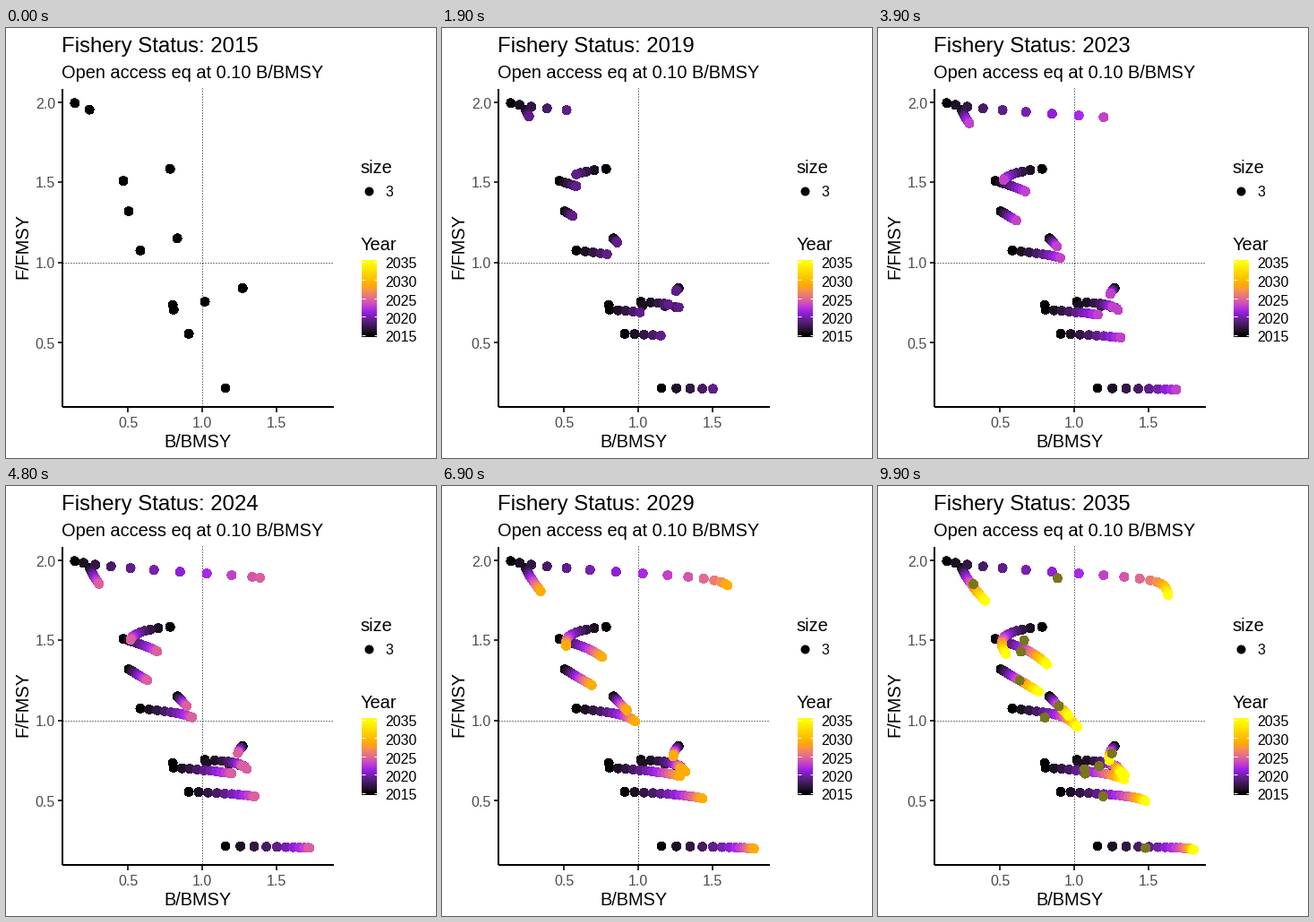
Recreate the animation shown at these times as a matplotlib script. Size 480 by 480 pixels, loop 10000 ms.

```python
import numpy as np
import matplotlib.pyplot as plt
from matplotlib.animation import FuncAnimation
from matplotlib.colors import to_rgb

plt.rcParams["font.family"] = ["Liberation Sans"]
PX = 0.9  # points per pixel at 80 dpi
START, YEARS = 2015, 21
DECAY = 0.9944  # yearly change of F/FMSY


def stock(b, f, growth, share=1.0):
    """Surplus-production path of B/BMSY while fishing pressure fades."""
    path = []
    for _ in range(YEARS):
        path.append((b, f))
        b += growth * b * (2 - share * f - b)
        f *= DECAY
    return path


STOCKS = [
    stock(0.145, 1.995, 0.28, share=0.205),
    stock(0.242, 1.955, 0.125, share=0.8),
    stock(0.470, 1.51, 0.26, share=0.85),
    stock(0.783, 1.585, 0.273),
    stock(0.506, 1.32, 0.084, share=0.9),
    stock(0.831, 1.15, 0.105, share=0.95),
    stock(0.584, 1.075, 0.295),
    stock(0.801, 0.735, 0.61),
    stock(0.807, 0.705, 0.14),
    stock(1.017, 0.755, 0.285),
    stock(1.270, 0.84, 0.036),
    stock(0.909, 0.555, 0.136),
    stock(1.155, 0.215, 0.138),
]


def x_px(b):
    return 52.3 + 166.4 * b


def y_px(f):
    return 439.9 - 178.7 * f


# Colours are blended in CIE Lab.
TO_XYZ = np.array([[0.4124, 0.3576, 0.1805],
                   [0.2126, 0.7152, 0.0722],
                   [0.0193, 0.1192, 0.9505]])
WHITE = TO_XYZ.sum(axis=1)


def rgb_to_lab(rgb):
    rgb = np.asarray(rgb, float)
    lin = np.where(rgb > 0.04045, ((rgb + 0.055) / 1.055) ** 2.4, rgb / 12.92)
    v = TO_XYZ @ lin / WHITE
    x, y, z = np.where(v > 0.008856, np.cbrt(v), 7.787 * v + 16 / 116)
    return np.array([116 * y - 16, 500 * (x - y), 200 * (y - z)])


def lab_to_rgb(lab):
    y = (lab[0] + 16) / 116
    v = np.array([y + lab[1] / 500, y, y - lab[2] / 200])
    xyz = np.where(v > 0.2069, v ** 3, (v - 16 / 116) / 7.787) * WHITE
    lin = np.clip(np.linalg.solve(TO_XYZ, xyz), 0, 1)
    return np.clip(np.where(lin > 0.0031308, 1.055 * lin ** (1 / 2.4) - 0.055,
                            12.92 * lin), 0, 1)


STOPS = np.array([rgb_to_lab(to_rgb(c))
                  for c in ("black", "#A020F0", "#FFA500", "yellow")])


def year_lab(u):
    return np.array([np.interp(u * 3, range(4), STOPS[:, k]) for k in range(3)])


paths = np.array(STOCKS).swapaxes(0, 1)  # year, stock, (b, f)
pos = np.dstack([x_px(paths[..., 0]), y_px(paths[..., 1])])
labs = [year_lab(u) for u in np.linspace(0, 1, YEARS)]
cols = np.array([lab_to_rgb(c) for c in labs])

fig = plt.figure(figsize=(6, 6), dpi=80, facecolor="white")
ax = fig.add_axes([0, 0, 1, 1])
ax.axis("off")


def text(x, y, s, size, color="black", **kw):
    kw.setdefault("va", "baseline")
    return ax.text(x, y, s, fontsize=size * PX, color=color, **kw)


def line(xs, ys, width, color="black", **kw):
    ax.plot(xs, ys, color=color, lw=width * PX, solid_capstyle="butt",
            dash_capstyle="butt", **kw)


# Panel
dots = dict(ls=(0, (1, 2)), zorder=1)
line([62.5, 365.5], [261, 261], 1, **dots)
line([218, 218], [421.5, 66.5], 1, **dots)
line([62.5, 62.5], [67.5, 422.5], 2, zorder=4)
line([62.5, 365.5], [422.5, 422.5], 2, zorder=4)
for v in (0.5, 1.0, 1.5, 2.0):
    y = np.floor(y_px(v)) + 0.5
    line([57.5, 62], [y, y], 2, "#333333", zorder=3)
    text(54.5, y + 6.5, f"{v:.1f}", 16, "#4D4D4D", ha="right")
    if v < 2:
        x = np.floor(x_px(v)) + 0.5
        line([x, x], [423, 428], 2, "#333333", zorder=3)
        text(x, 445, f"{v:.1f}", 16, "#4D4D4D", ha="center")
title = text(62, 27, "", 24)
text(62, 56, "Open access eq at 0.10 B/BMSY", 20)
text(213.5, 468, "B/BMSY", 20, ha="center")
text(27.5, 242.5, "F/FMSY", 20, rotation=90, ha="right", va="center")

# Legends
DOT = dict(s=(10 * PX) ** 2, linewidths=0, antialiased=False, zorder=2)
text(395, 162, "size", 20)
ax.scatter([404.5], [181.5], c="black", **DOT)
text(423, 188, "3", 16)
text(395, 248, "Year", 20)
bar = np.array([lab_to_rgb(year_lab(u)) for u in np.linspace(1, 0, 20)])
ax.imshow(bar[:, None, :], extent=(396.5, 413.5, 345, 259), aspect="auto",
          interpolation="bilinear", zorder=1)
for k in range(5):
    y = 342 - 20.5 * k
    for x in (396.5, 410):
        line([x, x + 3.5], [y, y], 1, "white", zorder=3)
    text(423, y + 8, str(START + 5 * k), 16)

points = ax.scatter([], [], **DOT)
ax.set_xlim(-0.5, 479.5)
ax.set_ylim(479.5, -0.5)

# Frames that show the half-way pose between two years
HALFWAY = [*range(3, 84, 5), *range(87, 100, 4)]


def draw(frame):
    k = sum(h < frame for h in HALFWAY)
    xy = pos[:k + 1].reshape(-1, 2)
    rgb = np.repeat(cols[:k + 1], len(STOCKS), axis=0)
    if frame in HALFWAY:
        n = (k + 1) % YEARS
        mix = lab_to_rgb((labs[k] + labs[n]) / 2)
        xy = np.vstack([xy, (pos[k] + pos[n]) / 2])
        rgb = np.vstack([rgb, np.tile(mix, (len(STOCKS), 1))])
    points.set_offsets(xy)
    points.set_facecolor(rgb)
    title.set_text(f"Fishery Status: {START + k}")
    return points, title


anim = FuncAnimation(fig, draw, frames=100, interval=100, repeat=True,
                     repeat_delay=0)
plt.show()
```
